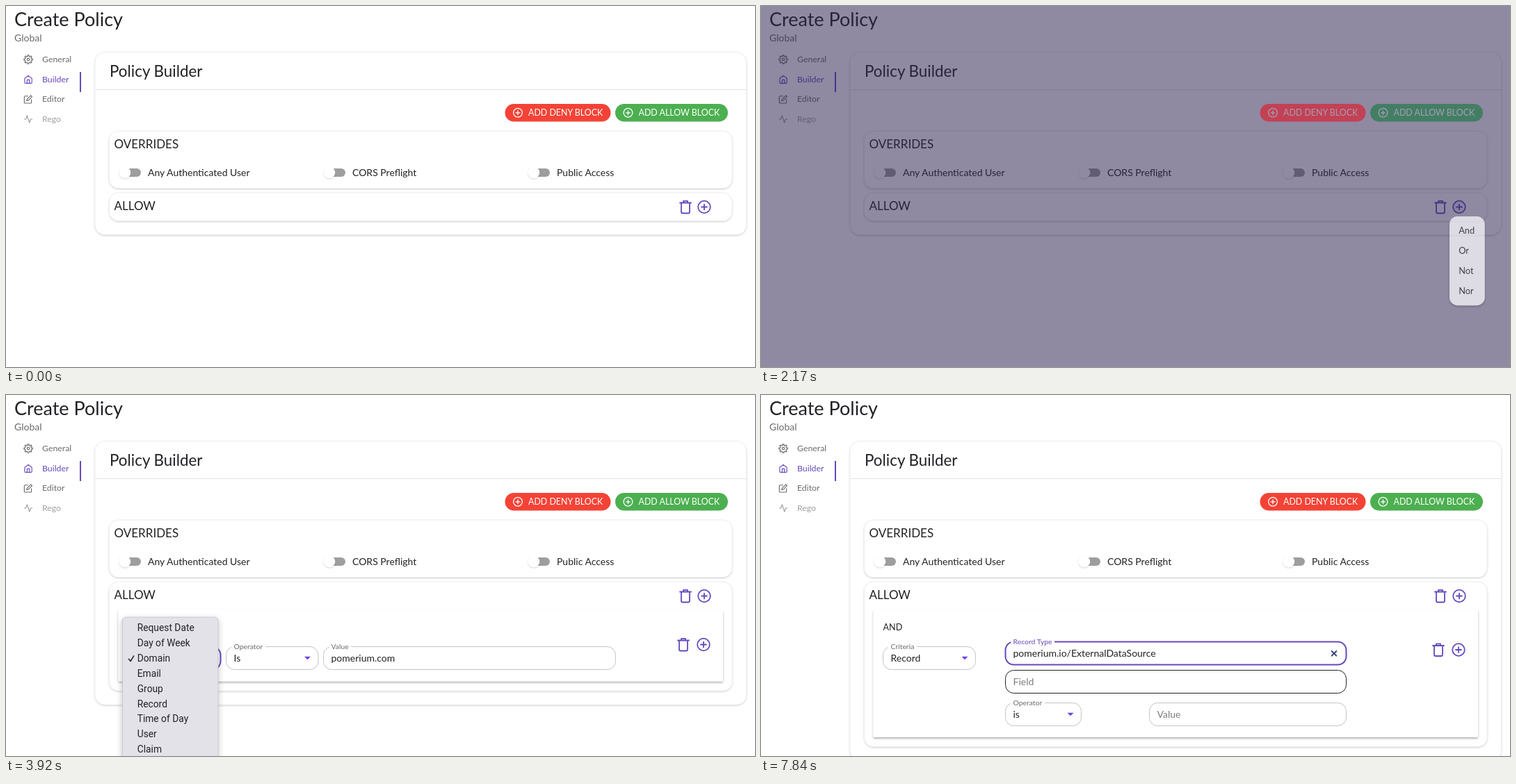
An HTML page for the animation above (8 s loop, 1077 by 520 pixels).

```html
<!DOCTYPE html>
<html lang="en">
<head>
<meta charset="utf-8">
<title>Create Policy</title>
<style>
  html, body { margin: 0; width: 100%; height: 100%; overflow: hidden; background: #fff; }
  svg { display: block; width: 1077px; height: 520px; font-family: "DM Sans", Lato, sans-serif; }
  .native { font-family: Roboto, "Liberation Sans", sans-serif; }
</style>
</head>
<body>
<svg id="stage" viewBox="0 0 1077 520"></svg>
<script>
const LOOP = 8000, STEP = 70;
const PURPLE = '#6549bd', INK = '#222226', GREY = '#6a6a6e';
const stage = document.getElementById('stage');

// Time at which each interaction happens
const T = {
  iconHover: 1820, menuIn: 2058, andHover: 2450, addAnd: 3010, menuOut: 3095,
  operatorHover: 3570, criteriaHover: 3640, popupOpen: 3920, popupPick: 5320,
  popupFade: 5460, record: 5530, recordFocus: 6440, listOpen: 6510,
  optionHover: 6860, chosen: 7280, fieldHover: 7770
};

const clamp = v => Math.max(0, Math.min(1, v));

// cubic-bezier(.4, 0, .2, 1)
function ease(x) {
  x = clamp(x);
  let lo = 0, hi = 1;
  for (let i = 0; i < 20; i++) {
    const u = (lo + hi) / 2, v = 1 - u;
    if (3 * v * v * u * .4 + 3 * v * u * u * .2 + u * u * u < x) lo = u; else hi = u;
  }
  return 3 * lo * lo - 2 * lo * lo * lo;
}

function mix(a, b, k) {
  return `rgb(${a.map((v, i) => Math.round(v + (b[i] - v) * k))})`;
}

const text = (x, y, size, str, fill = INK, more = '') =>
  `<text x="${x}" y="${y}" font-size="${size}" fill="${fill}" ${more}>${str}</text>`;

const box = (x, y, x2, y2, r, fill, more = '') =>
  `<rect x="${x}" y="${y}" width="${x2 - x}" height="${y2 - y}" rx="${r}" fill="${fill}" ${more}/>`;

const line = (d, color, width, more = '') =>
  `<path d="${d}" fill="none" stroke="${color}" stroke-width="${width}" stroke-linecap="round" stroke-linejoin="round" ${more}/>`;

const card = (x, y, x2, y2, r) =>
  box(x + .5, y + .5, x2 - .5, y2 - .5, r, '#fff', 'stroke="#eee" filter="url(#soft)"');

const plus = (x, y, r, color, width, fill = 'none') =>
  `<circle cx="${x}" cy="${y}" r="${r}" fill="${fill}" stroke="${color}" stroke-width="${width}"/>` +
  line(`M${x - r * .45} ${y}h${r * .9}M${x} ${y - r * .45}v${r * .9}`, color, width);

const trash = (x, y) =>
  line(`M${x - 8} ${y - 6}h16M${x - 3} ${y - 6}v-2.6h6v2.6M${x - 6} ${y - 6}v13q0 2 2 2h8q2 0 2-2v-13`, PURPLE, 1.8);

const arrow = (x, y) => `<path d="M${x - 4.5} ${y - 2.3}h9l-4.5 4.6z" fill="#6e43e0"/>`;

// Outlined input with optional floating label; state is '', 'hover' or 'focus'
function field(x, y, x2, { label = '', value = '', hint = '', state = '', select = false }) {
  const focus = state === 'focus';
  const color = focus ? PURPLE : state === 'hover' ? '#222' : '#c4c4c4';
  return box(x + .5, y + .5, x2 - .5, y + 33.5, 12, '#fff', `stroke="${color}" stroke-width="${focus ? 2 : 1}"`) +
    (label && text(x + 11.5, y + 3.7, 10.4, label, focus ? PURPLE : GREY,
      'stroke="#fff" stroke-width="8" stroke-linejoin="round" paint-order="stroke"')) +
    text(x + 11.5, y + 21.7, 14, value || hint, value ? INK : '#7c7c80') +
    (select ? arrow(x2 - 16, y + 17) : '');
}

function sidebar() {
  const icon = (y, d, color) =>
    line(d, color, 2, `transform="translate(25.2 ${y - 6.8}) scale(.57)"`);
  let teeth = '';
  for (let i = 0; i < 8; i++) {
    for (const [off, r] of [[-.24, 8], [-.15, 11], [.15, 11], [.24, 8]]) {
      const a = i * Math.PI / 4 + off;
      teeth += `${teeth ? 'L' : 'M'}${(12 + r * Math.cos(a)).toFixed(2)} ${(12 + r * Math.sin(a)).toFixed(2)}`;
    }
  }
  return icon(77, teeth + 'ZM15 12a3 3 0 1 1-6 0a3 3 0 1 1 6 0', GREY) +
    icon(105.7, 'M3 9.5L12 2.5l9 7V20q0 2-2 2H5q-2 0-2-2ZM9 22v-9h6v9', PURPLE) +
    icon(134.3, 'M11 4H4q-2 0-2 2v14q0 2 2 2h14q2 0 2-2v-7M18.5 2.5l3 3L12 15l-4 1 1-4Z', GREY) +
    icon(163, 'M22 12h-4l-3 9L9 3l-3 9H2', '#9a9a9e') +
    text(52, 81, 12.3, 'General', GREY) +
    text(52, 109.7, 12.3, 'Builder', PURPLE) +
    text(52, 138.3, 12.3, 'Editor', GREY) +
    text(52, 167, 12.3, 'Rego', '#a0a0a4') +
    box(106, 95, 108, 124, 0, PURPLE);
}

const toggle = (x, label) =>
  box(x - 5, 234, x + 23, 246, 6, '#9e9e9e') +
  `<circle cx="${x}" cy="240" r="8.3" fill="#fff" filter="url(#soft)"/>` +
  text(x + 33, 244.5, 14, label);

function domainRow(t) {
  const criteria = t >= T.popupOpen ? 'focus' : t >= T.criteriaHover ? 'hover' : '';
  const operator = t >= T.operatorHover && t < T.criteriaHover ? 'hover' : '';
  return field(175, 362, 309, { label: 'Criteria', value: 'Domain', select: true, state: criteria }) +
    field(316, 362, 449.5, { label: 'Operator', value: 'Is', select: true, state: operator }) +
    field(456, 362, 877, { label: 'Value', value: 'pomerium.com' }) +
    trash(974, 359.5) + plus(1003, 359.5, 8.8, PURPLE, 1.8);
}

function recordRow(t) {
  const focused = t >= T.recordFocus, chosen = t >= T.chosen;
  return field(175, 362, 309, { label: 'Criteria', value: 'Record', select: true, state: focused ? '' : 'focus' }) +
    field(351, 355, 842, {
      label: focused ? 'Record Type' : '', hint: focused ? '' : 'Record Type',
      value: chosen ? 'pomerium.io/ExternalDataSource' : '', state: focused ? 'focus' : ''
    }) +
    (chosen ? line('M820.7 369l6.6 6.6m0-6.6l-6.6 6.6', '#35407a', 2) : '') +
    field(351, 396, 842, { hint: 'Field', state: t >= T.fieldHover ? 'hover' : '' }) +
    field(351, 443, 461, { label: 'Operator', value: 'is', select: true }) +
    field(558, 443, 842, { hint: 'Value' }) +
    trash(974, 367) + plus(1003, 367, 8.8, PURPLE, 1.8);
}

function optionList(t) {
  if (t < T.listOpen || t >= T.chosen) return '';
  const names = ['ExternalDataSource', 'DirectoryGroup', 'DirectoryUser'];
  return box(351, 390, 842, 530, 10, '#fff', 'filter="url(#lift)"') +
    (t >= T.optionHover ? box(351, 397, 842, 429, 0, '#f5f5f5') : '') +
    names.map((n, i) => text(365, 418 + i * 34, 14, 'pomerium.io/' + n)).join('');
}

function page(t) {
  const hasAnd = t >= T.addAnd, isRecord = t >= T.record;
  const bottom = isRecord ? 507 : hasAnd ? 426.5 : 310;
  const hover = t >= T.iconHover && t < T.menuOut;
  let s = text(12, 29.3, 27, 'Create Policy') + text(12, 51, 14, 'Global', GREY) + sidebar() +
    card(127.5, 66, 1065, bottom + 20, 14) +
    text(149, 101.5, 22.4, 'Policy Builder') +
    box(128, 120, 1064.5, 121, 0, '#e2e2e4') +
    card(148, 179.5, 1044.5, 263, 13) +
    text(155.5, 205, 17, 'OVERRIDES') +
    toggle(171, 'Any Authenticated User') + toggle(465, 'CORS Preflight') + toggle(759, 'Public Access') +
    card(148, 268.5, 1044.5, bottom, 13) +
    text(155.5, 294, 17, 'ALLOW') +
    trash(977, 289.5);
  if (hasAnd) {
    s += box(161.5, 309.5, 1031, isRecord ? 493 : 412.5, 2, '#fff', 'filter="url(#lift)"') +
      text(175.5, 338.7, 12.6, 'AND') +
      (isRecord ? recordRow(t) : domainRow(t));
  }
  return s + plus(1004, 289.5, 8.8, PURPLE, 1.8, hover ? 'rgba(101,73,189,.1)' : 'none') + optionList(t);
}

function buttons(k) {
  const ink = mix([255, 255, 255], [140, 130, 158], k);
  const pill = (x, x2, fill, label) =>
    box(x, 141, x2, 166.5, 12.75, fill) + plus(x + 18.5, 153.8, 6.4, ink, 1.3) + text(x + 33.5, 158.2, 12.4, label, ink);
  return pill(717.5, 869.5, mix([244, 67, 54], [180, 64, 94], k), 'ADD DENY BLOCK') +
    pill(876, 1038, mix([76, 175, 80], [65, 112, 106], k), 'ADD ALLOW BLOCK');
}

function menu(t, k) {
  if (k <= 0) return '';
  const opening = t < T.addAnd;
  const items = opening ? ['And', 'Or', 'Not', 'Nor'] : ['Or', 'Not', 'Nor'];
  const width = opening ? 53 : 50;
  const scale = 1 - (opening ? .19 : .07) * (1 - k);
  const alpha = Math.pow(k, opening ? 1.4 : .6);
  const lit = t >= T.andHover && k === 1;
  return `<g opacity="${alpha}" transform="translate(990 303) scale(${scale})">` +
    box(0, 0, width, items.length * 30 + 14, 12, '#fff', 'filter="url(#lift)"') +
    (lit ? box(0, 7, width, 37, 0, '#f4f4f4') : '') +
    items.map((n, i) => text(13.8, 26.4 + i * 30.3, 13.4, n)).join('') + '</g>';
}

function popup(t) {
  if (t < T.popupOpen || t >= T.record) return '';
  const rows = ['Request Date', 'Day of Week', 'Domain', 'Email', 'Group', 'Record', 'Time of Day', 'User', 'Claim'];
  // [from time, highlighted row]
  const path = [[3920, -1], [3990, 2], [4340, 4], [4410, 6], [4480, 7], [4830, 6], [4900, 5], [T.popupPick, -1], [5390, 5]];
  const active = path.filter(p => t >= p[0]).pop()[1];
  const top = i => 324 + i * 21.9;
  return `<g class="native" opacity="${t >= T.popupFade ? .5 : 1}">` +
    box(167.5, 320, 305, 540, 5, '#e4e2e9', 'stroke="#c3c1c8" stroke-width=".8" filter="url(#popup)"') +
    (active >= 0 ? box(172.5, top(active) + .5, 300.5, top(active) + 22.4, 4, '#3f9efc') : '') +
    line('M176.5 380.3l2.6 3.2 4.6-7.6', active === 2 ? '#fff' : INK, 1.5) +
    rows.map((n, i) => text(188.7, top(i) + 16, 13.8, n, i === active ? '#fff' : INK)).join('') + '</g>';
}

const shadow = (id, dy, blur, opacity) =>
  `<filter id="${id}" x="-30%" y="-30%" width="160%" height="160%"><feDropShadow dx="0" dy="${dy}" stdDeviation="${blur}" flood-opacity="${opacity}"/></filter>`;
const defs = '<defs>' + shadow('soft', 1, .9, .2) + shadow('lift', 1.8, 1.6, .32) + shadow('popup', 3, 4, .25) + '</defs>';

function render(t) {
  const k = t < T.addAnd ? ease((t - T.menuIn) / 225) : 1 - ease((t - T.menuOut) / 195);
  stage.innerHTML = defs + page(t) +
    (k > 0 ? box(0, 0, 1077, 520, 0, `rgba(46,35,81,${.69 * k})`) : '') +
    buttons(k) + menu(t, k) + popup(t);
}

const start = performance.now();
let shown = -1;
function tick() {
  const t = (performance.now() - start) % LOOP;
  const stepped = Math.floor(t / STEP) * STEP;
  if (stepped !== shown) render(shown = stepped);
  requestAnimationFrame(tick);
}
tick();
</script>
</body>
</html>
```
